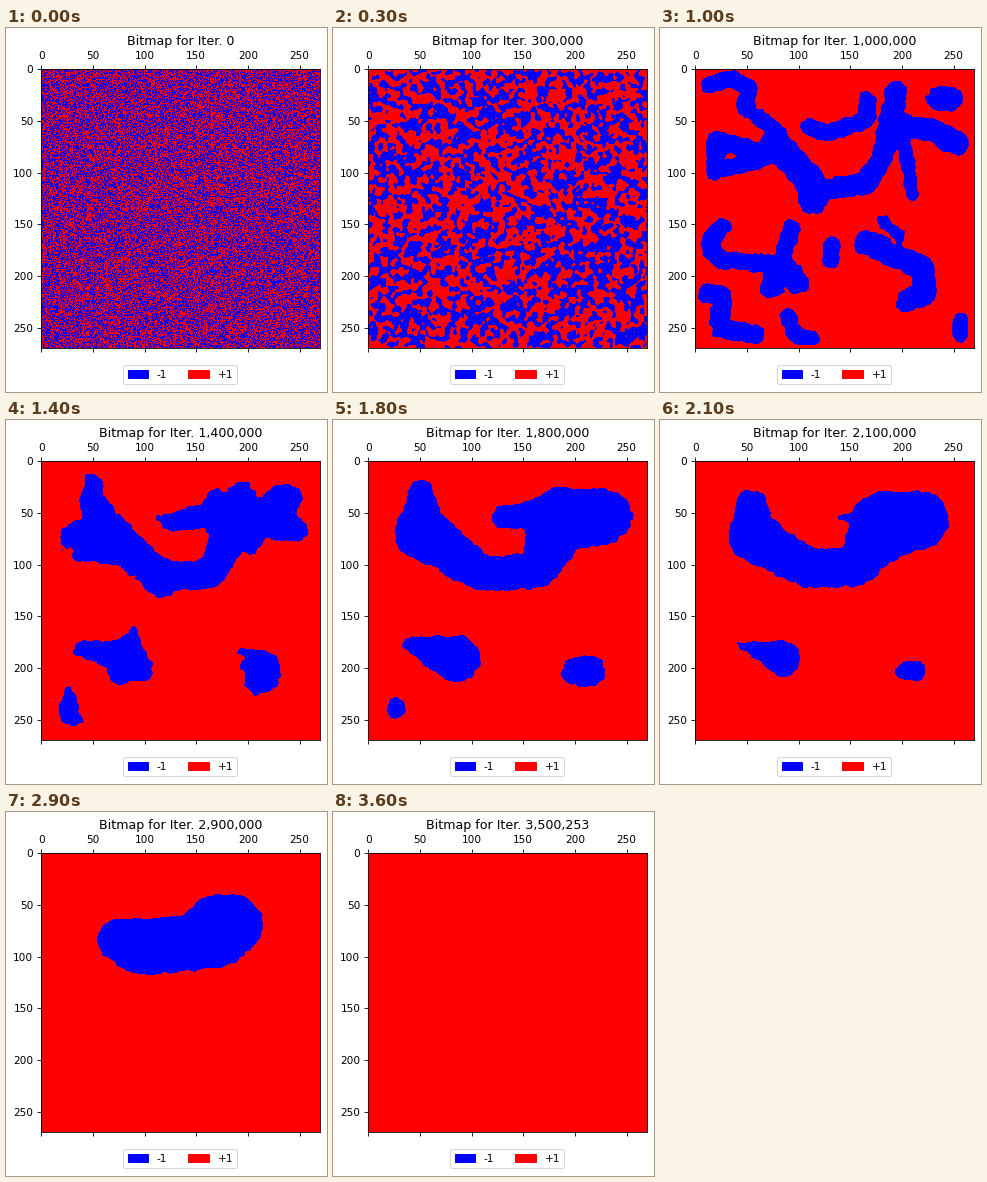
A matplotlib script that plays this animation: 321 by 364 pixels, repeating every 3700 ms.

```python
import numpy as np
import matplotlib.pyplot as plt
from matplotlib.animation import FuncAnimation
from matplotlib.colors import ListedColormap
from matplotlib.patches import Patch

W, H, DPI = 321, 364, 72
N, SIDE, LEFT, TOP = 270, 279, 34.8, 40.7
FRAMES, STEP, LAST = 37, 100_000, 3_500_253

# All text and line sizes are the defaults, slightly enlarged
SCALE = 1.048
plt.rcParams["font.size"] = 10 * SCALE
for name in ("axes.titlepad", "axes.linewidth", "patch.linewidth",
             "xtick.major.size", "xtick.major.pad", "xtick.major.width",
             "ytick.major.size", "ytick.major.pad", "ytick.major.width"):
    plt.rcParams[name] *= SCALE

# Cell centres in stage pixels
cells = (np.arange(N) + 0.5) * SIDE / N
X, Y = np.meshgrid(LEFT + cells, TOP + cells)
EDGE = np.minimum(SIDE / 2 - abs(X - LEFT - SIDE / 2),
                  SIDE / 2 - abs(Y - TOP - SIDE / 2))

# Domains once the noise has coarsened: radius, then the centre line
STROKES = [
    (8, (48, 57), (72, 50), (90, 60), (84, 78), (118, 104)),
    (9, (56, 111), (55, 142), (112, 128), (56, 111)),
    (15, (115, 115), (150, 152), (154, 170)),
    (11, (160, 162), (205, 156), (222, 130), (236, 64)),
    (9, (150, 99), (166, 105), (206, 92), (208, 72)),
    (12, (232, 98), (268, 100), (297, 115)),
    (7, (244, 112), (252, 166)),
    (13, (279, 70), (289, 70)),
    (9, (62, 198), (50, 215), (60, 232), (120, 236), (131, 200)),
    (12, (112, 258), (122, 238), (137, 254)),
    (8, (171, 217), (170, 234)),
    (6, (222, 193), (239, 207)),
    (12, (206, 214), (262, 240), (265, 264), (248, 272)),
    (10, (48, 265), (62, 268), (60, 300), (94, 306)),
    (8, (128, 288), (134, 306), (152, 311)),
    (7, (301, 291), (300, 307)),
]

# Poses of the last big domain: step, then (x, y, radius) along its body
POSES = [
    (18, [(88, 71, 12), (88, 112, 27), (150, 154, 17),
          (205, 150, 18), (228, 100, 33), (272, 96, 27)]),
    (25, [(95, 103, 21), (102, 123, 24), (142, 141, 22),
          (185, 140, 23), (218, 114, 37), (243, 104, 32)]),
    (29, [(115, 128, 23), (130, 133, 27), (150, 134, 28),
          (185, 130, 28), (211, 119, 36), (227, 113, 30)]),
]
CENTRE, GONE = (184, 119), 36
# Side pieces: step at which they are gone, then (x, y, radius)
PIECES = [
    (22, [(168, 98, 10), (228, 92, 20)]),
    (25, [(78, 224, 8), (122, 238, 24)]),
    (23, [(243, 251, 14), (256, 251, 16)]),
    (20, [(64, 285, 9), (63, 290, 9)]),
]


def chain(pts):
    """Signed distance, positive inside, to a line of varying radius."""
    out = np.full((N, N), -1e3)
    for (x0, y0, r0), (x1, y1, r1) in zip(pts, pts[1:]):
        dx, dy = x1 - x0, y1 - y0
        u = ((X - x0) * dx + (Y - y0) * dy) / (dx * dx + dy * dy + 1e-9)
        u = np.clip(u, 0, 1)
        d = np.hypot(X - x0 - u * dx, Y - y0 - u * dy)
        out = np.maximum(out, r0 + u * (r1 - r0) - d)
    return out


def blur(a, sigma):
    f = np.fft.fftfreq(N)
    gain = np.exp(-2 * (np.pi * sigma) ** 2 * (f[:, None] ** 2 + f ** 2))
    return np.fft.ifft2(np.fft.fft2(a) * gain).real


def grain(seed, sigma):
    out = blur(np.random.default_rng(seed).standard_normal((N, N)), sigma)
    return out / out.std()


def body(t):
    times = [step for step, _ in POSES]
    poses = np.array([pts for _, pts in POSES], float)
    i = min(np.searchsorted(times, t, side="right"), len(times) - 1)
    u = min((t - times[i - 1]) / (times[i] - times[i - 1]), 1)
    pts = (1 - u) * poses[i - 1] + u * poses[i]
    if t > times[-1]:
        # A shrinking domain loses area at a constant rate
        s = np.sqrt((GONE - t) / (GONE - times[-1]))
        pts[:, :2] = CENTRE + (pts[:, :2] - CENTRE) * s * s
        pts[:, 2] = pts[:, 2] * s - 4 * (1 - s)
    return chain(pts)


def domains(t):
    out = body(t)
    for end, pts in PIECES:
        if t < end:
            loss = 1 - np.sqrt((end - t) / (end - 18))
            out = np.maximum(out, chain(pts) - max(p[2] for p in pts) * loss)
    return blur(out, 2.5)


patches = blur(np.max([chain([(x, y, r) for x, y in line])
                       for r, *line in STROKES], axis=0), 1.5)
settled = domains(18)


def field(t):
    """Positive where the bitmap holds -1."""
    if t < 10:
        w = (t / 10) ** 2.5
        return ((1 - w) * (grain(7, 0.55 * t) - 0.015 * t)
                + w * np.clip(patches / 10, -1, 1)
                - 8 * w * np.exp(-EDGE / 1.5))
    rough = 0.7 * grain(100 + t, 2)
    if t < 18:
        u = (t - 10) / 8
        a, b = (np.clip(d, -14, 14) for d in (patches, settled))
        return (1 - u) * a + u * b + rough
    return domains(t) + rough


bitmaps = [np.where(field(t) > 0, -1, 1) for t in range(FRAMES)]

fig = plt.figure(figsize=(W / DPI, H / DPI), dpi=DPI, facecolor="white")
ax = fig.add_axes([LEFT / W, 1 - (TOP + SIDE) / H, SIDE / W, SIDE / H])
img = ax.matshow(bitmaps[0], cmap=ListedColormap(["blue", "red"]),
                 vmin=-1, vmax=1)
title = ax.set_title("")
ax.legend(handles=[Patch(color="blue", label="-1"),
                   Patch(color="red", label="+1")],
          loc="upper center", bbox_to_anchor=(0.5, -0.045), ncol=2)


def update(t):
    img.set_data(bitmaps[t])
    title.set_text(f"Bitmap for Iter. {min(t * STEP, LAST):,}")
    return img, title


anim = FuncAnimation(fig, update, frames=FRAMES, interval=100,
                     repeat=True, repeat_delay=0, blit=False)
plt.show()
```
